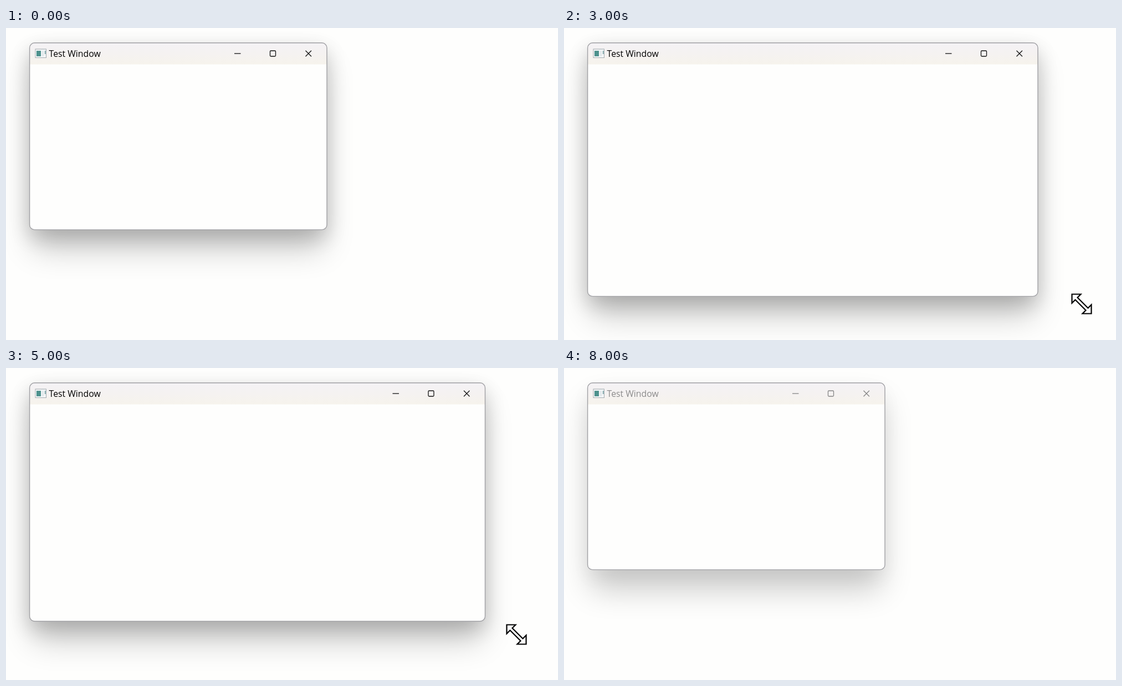
Write an HTML page that moves like this. It is 996 px wide and 562 px high and loops after 8400 ms.

```html
<!DOCTYPE html>
<html lang="en">
<head>
<meta charset="utf-8">
<title>Window resize</title>
<style>
  html, body { margin: 0; width: 100%; height: 100%; overflow: hidden; background: #fefefd; }
  svg { display: block; width: 100vw; height: 100vh; }
  text { font: 15.8px "Open Sans", "Noto Sans", sans-serif; }
  .wide { filter: blur(28px); }
  .near { filter: blur(18px); }
</style>
</head>
<body>
<svg viewBox="0 0 996 562" preserveAspectRatio="none">
  <defs>
    <linearGradient id="bar" x2="0" y2="1">
      <stop offset="0" stop-color="#f4f2f5"/>
      <stop offset=".5" stop-color="#f5f2f1"/>
      <stop offset="1" stop-color="#f6f3ec"/>
    </linearGradient>
  </defs>
  <rect class="wide" id="wide" x="48" y="62" rx="9" opacity=".2"/>
  <rect class="near" id="near" x="42" y="40" rx="9"/>
  <rect id="pane" x="42.6" y="26.8" rx="9" fill="#fefefd"/>
  <path id="head" fill="url(#bar)"/>
  <rect id="edge" x="42.6" y="26.8" rx="9" fill="none" stroke="#a0a0a4" stroke-width="1.4"/>

  <g id="icon">
    <rect x="53" y="38" width="19.5" height="15.5" fill="#f4f7f8" stroke="#a4abb0"/>
    <path d="M53 38H72.5" stroke="#c3c8cc"/>
    <rect x="55" y="41" width="8" height="10" fill="#4d918d"/>
    <rect x="64.5" y="41" width="4" height="10" fill="#e3e9ec"/>
    <rect x="70" y="41" width="1.5" height="6" fill="#6b9a9c"/>
  </g>
  <text id="title" x="77.5" y="52.3">Test Window</text>
  <g id="buttons" fill="none" stroke-width="1.3">
    <path d="M-167 46H-155.5"/>
    <rect x="-102.5" y="41" width="10" height="10" rx="1.5"/>
    <path d="M-38.5 40.7L-28 51.2M-28 40.7L-38.5 51.2"/>
  </g>

  <g id="cursor" fill="#fff" stroke="#000" stroke-width="2.2">
    <path id="arrow" d="M1 1V35L9 28L14.5 40L20 37.5L14.5 26H26Z"/>
    <path id="sizer" d="M-17.5 -17.5H-1.5L-7.5 -11.5L11.5 7.5L17.5 1.5V17.5H1.5L7.5 11.5L-11.5 -7.5L-17.5 -1.5Z"/>
  </g>
</svg>
<script>
  const LOOP = 8400, STEP = 200;
  const LEFT = 42, TOP = 26, MIN_X = 579, MIN_Y = 363;
  const SHOW = 4, GRAB = 12, RELEASE = 36, HIDE = 37, BLUR = 40;
  const el = id => document.getElementById(id);
  const set = (id, attrs) => {
    for (const k in attrs) el(id).setAttribute(k, attrs[k]);
  };

  // Turning points of the pointer: step, x, y
  const turns = [
    [SHOW, 762, 425], [8, 574, 366], [GRAB, 581.5, 365], [13, 581.5, 365],
    [14, 781, 473], [15, 934, 497], [19, 968, 512], [20, 660, 390], [21, 489, 302.5],
    [25, 921, 480], [26, 788, 461.5], [27, 801, 470.5], [31, 547, 343.5], [34, 392, 237]
  ];

  function pointer(n) {
    const i = turns.findIndex(turn => turn[0] >= n);
    if (i < 1) return turns.at(i).slice(1);
    const [t0, x0, y0] = turns[i - 1], [t1, x1, y1] = turns[i];
    const k = (n - t0) / (t1 - t0);
    return [x0 + (x1 - x0) * k, y0 + (y1 - y0) * k];
  }

  // The dragged corner trails the pointer by half a step
  function corner(n) {
    if (n < GRAB) return [MIN_X, MIN_Y];
    const [x, y] = pointer(n - .5);
    return [Math.max(MIN_X, x - 2.5), Math.max(MIN_Y, y - 2)];
  }

  function draw(time) {
    const n = Math.floor((time % LOOP) / STEP);
    const active = n < BLUR;
    const [x, y] = corner(n);
    const width = x - LEFT, height = y - TOP;
    const inner = { width: width - .6, height: height - .4 };

    set("wide", { width: width - 12, height });
    set("near", { width, height, opacity: active ? .18 : .04 });
    set("pane", inner);
    set("edge", inner);
    set("head", { d: `M43 65.5V36Q43 27 52 27H${x - 9}Q${x} 27 ${x} 36V65.5Z` });
    set("title", { fill: active ? "#000" : "#8b8b8b" });
    set("buttons", {
      transform: `translate(${x} 0)`,
      stroke: active ? "#111" : "#858585"
    });

    const sizing = n >= 8 && n < RELEASE;
    set("cursor", {
      transform: `translate(${pointer(n)})`,
      visibility: n >= SHOW && n < HIDE ? "visible" : "hidden"
    });
    set("arrow", { display: sizing ? "none" : "inline" });
    set("sizer", { display: sizing ? "inline" : "none" });
  }

  const start = performance.now();
  function tick() {
    draw(performance.now() - start);
    requestAnimationFrame(tick);
  }
  tick();
</script>
</body>
</html>
```
